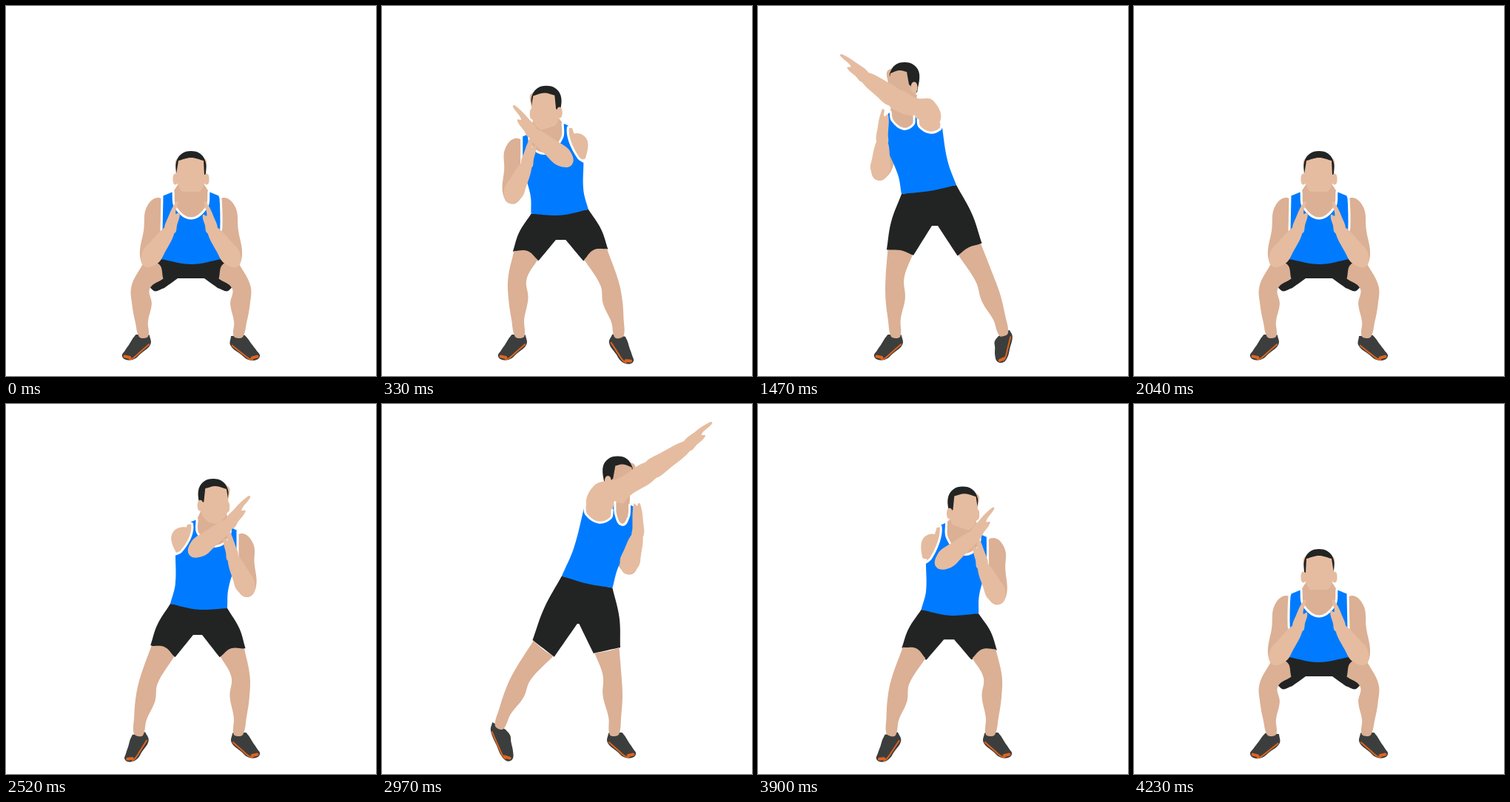
An HTML page that plays this animation: 500x500 px, repeating every 4380 ms.

```html
<!DOCTYPE html>
<html lang="en">
<head>
<meta charset="utf-8">
<title>Squat with reach</title>
<style>
html, body { margin: 0; width: 100%; height: 100%; overflow: hidden; background: #fff; }
svg { display: block; width: 100vw; height: 100vh; }
path { stroke-linejoin: round; stroke-linecap: round; }
</style>
</head>
<body>
<svg viewBox="0 0 500 500"><g id="man"></g></svg>
<script>
const LIGHT = '#e5bca0', DARK = '#dbb095', BLACK = '#222423', BLUE = '#007bff', SHOE = '#3c3e3d', ORANGE = '#e0641f';
const LOOP = 4380, STEP = 30;
const man = document.getElementById('man');

// Joints while squatting, half up, reaching and reaching far. The full reach carries the last move on.
// "2" joints belong to the reaching side; with three places given, the squat mirrors the guard side.
const KEYS = [0, .375, .594, .742, 1];
const JOINTS = {
  head: '250,226 220,131 198,106 186,102',
  shoulder: '205,274 181,190 180,178 178,176',
  elbow: '194,341 175,248 165,223 166,219',
  wrist: '222,302 194,207 168,182 158,178',
  tip: '231,265 202,167 169,140 157,136',
  shoulder2: '257,185 226,147 208,135',
  elbow2: '242,196 184,124 150,99',
  wrist2: '197,161 143,95 101,66',
  tip2: '171,125 112,66 70,36',
  strap: '211,257 187,171 174,147 163,141',
  neck: '226,251 196,167 179,143 169,138',
  dip: '250,287 222,192 196,166 181,164',
  neck2: '242,156 211,149 192,137',
  strap2: '254,161 216,154 196,146',
  armhole2: '291,280 251,180 232,171 214,163',
  side: '210,304 187,209 171,187 162,180',
  side2: '271,203 248,158 232,143',
  waist: '209,342 201,276 194,254 190,250',
  waist2: '278,270 268,242 260,235',
  crotch: '250,368 241,312 239,297 236,297',
  hem: '199,358 194,336 192,333 195,333',
  knee: '182,380 183,368 185,367 188,366',
  ankle: '186,446 186,446 186,446 186,446',
  hem2: '288,334 286,329 283,330',
  knee2: '307,374 306,368 309,367',
  ankle2: '321,446 332,443 339,438',
  toe2: '342,474 338,481 327,481 327,481',
};
const SCALARS = {
  girth: [15, 21, 22, 23],     // reaching shoulder
  thumb: [.65, .65, .85, .95],
  turn: [0, .45, 1, 1],        // head
  roll: [1, .9, -.9, -1],      // pivoting foot
  fold: [12, 6, 3, 0],         // knee over shorts
  gap: [18, 6, 4, 2],          // half width of the crotch
};

const carry = v => [...v, v[3] + .65 * (v[3] - v[2])];
const places = s => s.split(' ').map(q => q.split(',').map(Number));
const tracks = {};
for (const [name, s] of Object.entries(JOINTS)) {
  const at = places(s);
  if (at.length < 4) {
    const [x, y] = places(JOINTS[name.slice(0, -1)])[0];
    at.unshift([500 - x, y]);
  }
  tracks[name] = [0, 1].map(i => carry(at.map(q => q[i])));
}
for (const name in SCALARS) tracks[name] = carry(SCALARS[name]);

function valueAt(v, p) {
  const s = KEYS.slice(1).map((k, i) => (v[i + 1] - v[i]) / (k - KEYS[i]));
  const mean = (a, b) => a * b > 0 ? 2 * a * b / (a + b) : 0;
  const launch = s[0] * s[1] > 0 ? Math.sign(s[0]) * Math.min(1.3 * Math.abs(s[0]), 3 * Math.abs(s[1])) : 0;
  const m = [0, launch, mean(s[1], s[2]), mean(s[2], s[3]), 0];
  let i = 0;
  while (i < 3 && p > KEYS[i + 1]) i++;
  const h = KEYS[i + 1] - KEYS[i], u = (p - KEYS[i]) / h;
  return v[i] + (v[i + 1] - v[i]) * u * u * (3 - 2 * u)
    + h * (m[i] * u * (1 - u) ** 2 + m[i + 1] * u * u * (u - 1));
}

function poseAt(p) {
  const j = {};
  for (const [name, t] of Object.entries(tracks))
    j[name] = t.length === 2 ? t.map(v => valueAt(v, p)) : valueAt(t, p);
  j.armSkin = blend(DARK, LIGHT, p / .375);
  j.faceSkin = blend(LIGHT, DARK, (p - .375) / .25);
  return j;
}

function blend(a, b, u) {
  const k = Math.max(0, Math.min(1, u));
  const ch = (c, i) => parseInt(c.slice(i, i + 2), 16);
  return 'rgb(' + [1, 3, 5].map(i => Math.round(ch(a, i) + (ch(b, i) - ch(a, i)) * k)) + ')';
}

// Geometry
const add = (a, x, y) => [a[0] + x, a[1] + y];
const lerp = (a, b, u) => [a[0] + (b[0] - a[0]) * u, a[1] + (b[1] - a[1]) * u];
function unit(a, b) {
  const x = b[0] - a[0], y = b[1] - a[1], l = Math.hypot(x, y) || 1;
  return [x / l, y / l];
}
// Point u along direction d from a, and v to its side.
const along = (a, d, u, v) => [a[0] + d[0] * u - d[1] * v, a[1] + d[1] * u + d[0] * v];
const poly = pts => 'M' + pts.join('L') + 'Z';

// Smooth line through points, sharp at corners.
function smooth(pts, corners = [], open = false) {
  const n = pts.length, f = x => x.toFixed(2);
  const at = i => open ? pts[Math.max(0, Math.min(n - 1, i))] : pts[(i + n) % n];
  const dir = (i, from, to) => corners.includes(i % n) ? unit(from, to) : unit(at(i - 1), at(i + 1));
  let d = 'M' + pts[0].map(f);
  for (let i = 0; i < n - (open ? 1 : 0); i++) {
    const a = at(i), b = at(i + 1), l = Math.hypot(b[0] - a[0], b[1] - a[1]) * .37;
    const u = dir(i, a, b), w = dir(i + 1, a, b);
    d += 'C' + [a[0] + u[0] * l, a[1] + u[1] * l, b[0] - w[0] * l, b[1] - w[1] * l, ...b].map(f);
  }
  return open ? d : d + 'Z';
}

// Outline round a chain of joints; profile rows are [place, width one side, width other side].
function limb(joints, profile, cap, endCap, side = 1, corners = []) {
  const pos = t => {
    const i = Math.max(0, Math.min(joints.length - 2, Math.floor(t)));
    return lerp(joints[i], joints[i + 1], t - i);
  };
  const dir = t => unit(pos(t - .15), pos(t + .15));
  const edge = (col, s) => profile.map(r => along(pos(r[0]), dir(r[0]), 0, r[col] * s));
  const end = profile[profile.length - 1][0];
  return smooth([...edge(1, side), along(pos(end), dir(end), endCap, 0),
    ...edge(2, -side).reverse(), along(pos(0), dir(0), -cap, 0)], corners);
}

const oval = (c, rx, ry) => smooth([add(c, -rx, 0), add(c, 0, -ry), add(c, rx, 0), add(c, 0, ry)]);

// U-shaped opening from a to b with its bottom at dip.
function scoop(a, dip, b) {
  const mid = lerp(a, b, .5), x = (dip[0] - mid[0]) * .58, y = (dip[1] - mid[1]) * .58;
  return [a, add(lerp(a, b, .06), x, y), dip, add(lerp(b, a, .06), x, y), b];
}

// Body parts
const LEG = [[0, 17, 17], [1, 12.5, 12.5], [1.35, 13, 13.5], [1.72, 10, 7], [2, 6.5, 6.5]];
const FOREARM = [[0, 12.5, 12.5], [.4, 12, 12], [1, 7, 7]];

const leg = (j, k, side) => limb([j['hem' + k], j['knee' + k], j['ankle' + k]], LEG, j.fold, 3, side, [0, 10]);
const upperArm = (j, k, r) => limb([j['shoulder' + k], j['elbow' + k]], [[0, r, r], [.45, 14, 14], [1, 13, 13]], r, 13);
const forearm = (j, k) => limb([j['elbow' + k], j['wrist' + k]], FOREARM, 13, 3);

function hand(wrist, tip, thumb, side) {
  const d = unit(wrist, tip), l = Math.hypot(tip[0] - wrist[0], tip[1] - wrist[1]);
  const at = (u, v) => along(wrist, d, u * l, v * side);
  return smooth([at(-.1, -6.5), at(.45, -6.5), at(1, -1.5), at(1, 1.5), at(thumb - .06, 2),
    at(thumb, 7), at(.2, 7.5), at(-.1, 6.5)]);
}

// Shoe outline, sole line and toe cap; roll tells which side of the sole shows.
function shoe(ankle, toe, roll) {
  const d = unit(ankle, toe), k = Math.hypot(toe[0] - ankle[0], toe[1] - ankle[1]) / 39;
  const shift = 2 + 3 * roll, at = (u, v) => along(ankle, d, u * k, v);
  const flank = s => [at(-1 - 6 * roll * s, 7 * s), at(7 - 5.5 * roll * s, shift + 11.5 * s),
    at(20, shift + 10 * s), at(31, shift + 8.5 * s), at(39, shift / 2 + 4 * s)];
  return {
    body: smooth([...flank(1), ...flank(-1).reverse()], [0, 9]),
    sole: smooth([[3, 10], [20, 8], [31, 6.5], [36, 4]].map(([u, v]) => at(u, shift + roll * v)), [], true),
    cap: 'M' + at(33.5, shift / 2 + 5 * roll) + 'L' + at(37, shift / 2 - roll),
  };
}

function shorts(j) {
  const drop = Math.max(0, j.fold - 6) * 2;
  const half = (k, s) => {
    const d = unit(j['hem' + k], j['knee' + k]), c = add(j['hem' + k], 0, drop);
    const outer = along(c, d, 0, 18.5 * s), hip = add(lerp(j['waist' + k], outer, .5), -4 * s, 0);
    return [j['waist' + k], hip, outer, add(c, 0, drop * 1.2), along(c, d, 0, -18.5 * s), add(j.crotch, -j.gap * s, 0)];
  };
  return smooth([...half('', 1), ...half('2', -1).reverse()], [0, 2, 4, 5, 6, 7, 9, 11]);
}

function vest(j) {
  const sag = add(lerp(j.waist, j.waist2, .5), 1, 7 - 5 * j.turn);
  return smooth([j.strap, ...scoop(j.neck, j.dip, j.neck2), ...scoop(j.strap2, j.armhole2, j.side2),
    add(lerp(j.side2, j.waist2, .6), -4, 0), j.waist2, sag, j.waist,
    add(lerp(j.side, j.waist, .6), 4, 0), j.side], [0, 1, 5, 6, 10, 12, 14, 16]);
}

function face(j) {
  const half = [[18, -20], [19, 0], [18, 15], [10, 27]], c = add(j.head, -3 * j.turn, 0);
  return smooth([...half.map(q => add(c, ...q)), add(c, 0, 31),
    ...half.map(([x, y]) => add(c, -x, y)).reverse()]);
}

function hair(j) {
  const t = j.turn, at = (x, y) => add(j.head, x, y);
  return smooth([at(-20, 2 - 12 * t), at(-20, -15), at(-13, -26), at(0, -30), at(13, -26), at(20, -14),
    at(20 - 3 * t, 2 + 9 * t), at(18 - 12 * t, 2 - 2 * t), at(17 - 14 * t, -17),
    at(-7 * t, -21 + 2 * t), at(-17 - 2 * t, -17 + 2 * t)], [0, 6, 7, 8, 10]);
}

const line = (stroke, width) => ({ fill: 'none', stroke, 'stroke-width': width });
const trim = { stroke: '#fff', 'stroke-width': 3 };
const parts = [];
function part(attrs, shape, fill) {
  const el = document.createElementNS('http://www.w3.org/2000/svg', 'path');
  for (const k in attrs) el.setAttribute(k, attrs[k]);
  parts.push({ el: man.appendChild(el), shape, fill });
}

const feet = [j => shoe([184, 445], [158, 474], -1), j => shoe(j.ankle2, j.toe2, j.roll)];
feet[0] = j => shoe([316, 445], [342, 474], 1);
feet.forEach((foot, i) => {
  const flip = i ? {} : { transform: 'matrix(-1 0 0 1 500 0)' };
  part({ ...flip, fill: SHOE }, j => foot(j).body);
  part({ ...flip, ...line(ORANGE, 2) }, j => foot(j).sole);
  part({ ...flip, ...line(ORANGE, 4) }, j => foot(j).cap);
});
part({ fill: BLACK }, shorts);
part({ fill: DARK }, j => leg(j, '', 1));
part({ fill: DARK }, j => leg(j, '2', -1));
part({ fill: DARK }, j => upperArm(j, '', 15));
part({ fill: DARK }, j => poly([j.neck, j.dip, j.neck2, add(j.head, 17, 14), add(j.head, -17, 14)]));
part({ fill: LIGHT }, j => oval(add(j.head, -21 + 5 * j.turn, 8), 3.5, 7.5));
part({}, face, j => j.faceSkin);
part({ fill: BLACK }, hair);
part({ fill: LIGHT }, j => oval(add(j.head, 21 - 8 * j.turn, 8 - 4 * j.turn), 3.5 + j.turn, 7.5));
part({}, j => upperArm(j, '2', j.girth), j => j.armSkin);
part({ fill: BLUE }, vest);
part({ ...trim, fill: DARK }, j => smooth(scoop(j.neck, j.dip, j.neck2), [0, 4], true));
part(trim, j => smooth(scoop(j.strap2, j.armhole2, j.side2), [0, 4], true), j => j.armSkin);
part(trim, j => 'M' + j.strap + 'L' + j.side);
for (const [k, side] of [['', 1], ['2', -1]]) {
  part({ fill: LIGHT }, j => forearm(j, k));
  part({ fill: LIGHT }, j => hand(j['wrist' + k], j['tip' + k], k ? .58 : j.thumb, side));
}

const ramp = (t, a, b) => Math.max(0, Math.min(1, (t - a) / (b - a)));

function frame(now) {
  const t = Math.floor(now % LOOP / STEP) * STEP, right = t >= 2160;
  const j = poseAt(right
    ? ramp(t, 2160, 3120) - ramp(t, 3270, 4230)
    : ramp(t, 0, 930) - ramp(t, 1080, 2040));
  man.setAttribute('transform', right ? 'matrix(-1 0 0 1 500 0)' : '');
  for (const { el, shape, fill } of parts) {
    el.setAttribute('d', shape(j));
    if (fill) el.setAttribute('fill', fill(j));
  }
}

let start = null;
function tick(now) {
  if (start === null) start = now;
  frame(now - start);
  requestAnimationFrame(tick);
}
frame(0);
requestAnimationFrame(tick);
</script>
</body>
</html>
```
